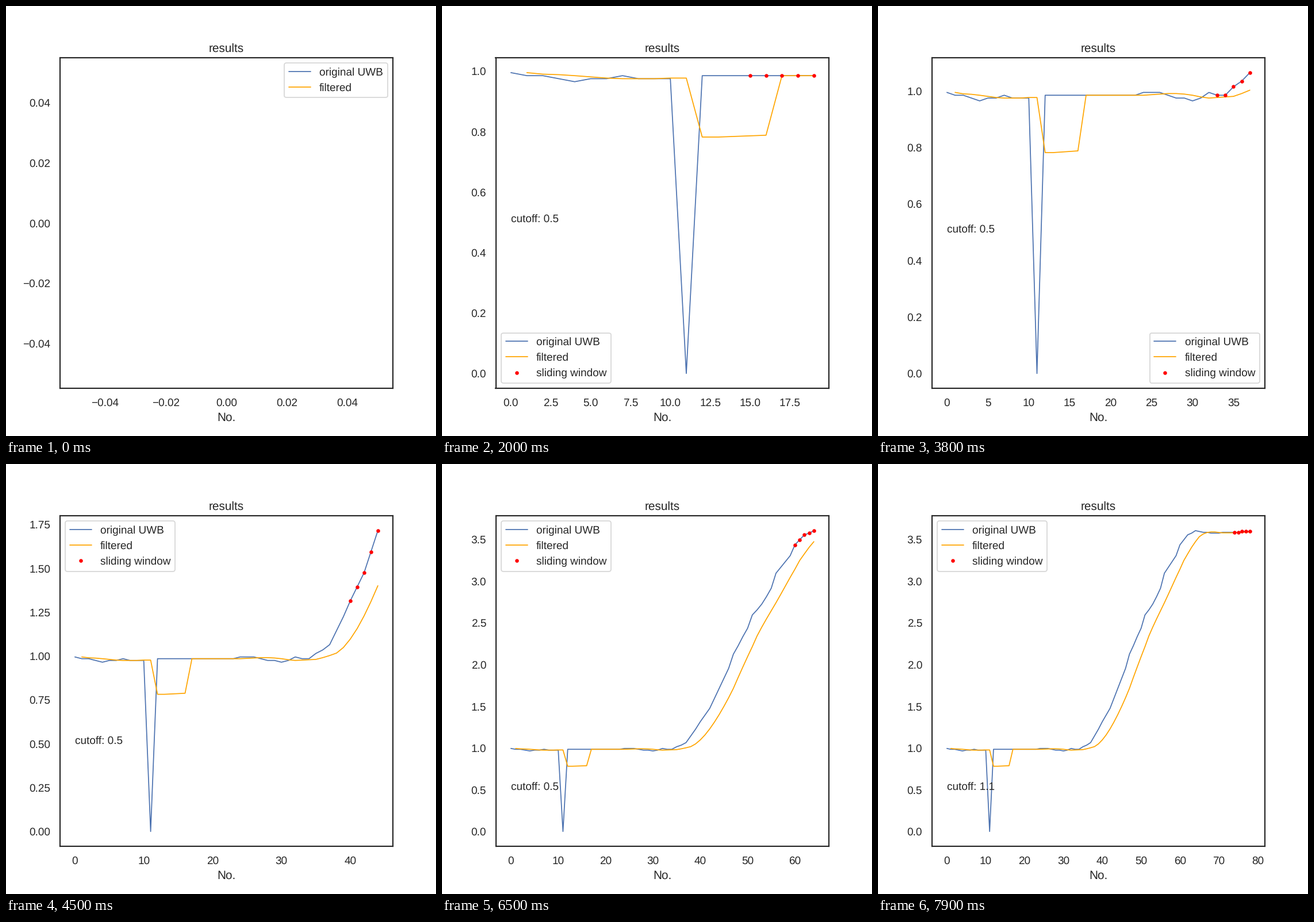
Recreate the animation shown at these times as a matplotlib script. Size 748 by 748 pixels, loop 8 s.

```python
import matplotlib.pyplot as plt
import numpy as np
from matplotlib.animation import FuncAnimation

INK = "0.15"
WINDOW = 5
FRAMES = 80
DROPOUT = 11
CUTOFF_SWITCH = 72

plt.rcParams.update({
    "font.family": "Liberation Sans",
    "font.size": 12,
    "text.hinting": "none",
    "text.color": INK,
    "axes.labelcolor": INK,
    "axes.edgecolor": INK,
    "axes.linewidth": 1.25,
    "axes.titlesize": 12,
    "axes.labelsize": 12,
    "legend.fontsize": 11,
    "lines.linewidth": 1,
    "lines.solid_capstyle": "round",
    "figure.subplot.bottom": 0.1104,
})
for axis, side in (("xtick", "bottom"), ("ytick", "left")):
    plt.rcParams.update({
        f"{axis}.{side}": False,
        f"{axis}.major.size": 6,
        f"{axis}.labelsize": 11,
        f"{axis}.color": INK,
    })

# Turning points of the measured distance: (step, millimetres)
REST = [(0, 995), (2, 985), (4, 965), (7, 985), (8, 975), (12, 985),
        (23, 985), (24, 995), (26, 995), (30, 965), (32, 995), (34, 985)]
CLIMB = [(37, 1065), (42, 1475), (46, 1955), (47, 2125), (50, 2435),
         (51, 2595), (53, 2725), (55, 2915), (56, 3095), (59, 3305),
         (60, 3435), (62, 3555), (64, 3605), (68, 3575), (78, 3595)]


def measure(steps):
    """Walk between turning points on the sensor's 10 mm grid."""
    path = np.interp(steps, *zip(*REST, *CLIMB))
    metres = (10 * np.ceil(path / 10) - 5) / 1000
    metres[DROPOUT] = 0
    return metres


steps = np.arange(FRAMES - 1)
readings = measure(steps)

# Each filtered value is the mean of the readings just before it
filtered = np.array([readings[max(0, i - WINDOW):i].mean() for i in steps[1:]])

fig, ax = plt.subplots(figsize=(6, 6), dpi=748 / 6)


def draw(n):
    ax.clear()
    ax.plot(steps[:n], readings[:n], color="#4C72B0", label="original UWB")
    ax.plot(steps[1:n], filtered[:max(n - 1, 0)], color="orange",
            label="filtered")
    if n > 0:
        recent = slice(max(0, n - WINDOW), n)
        ax.plot(steps[recent], readings[recent], "r.", markersize=5.5,
                label="sliding window")
    cutoff = 0.5 if n < CUTOFF_SWITCH else 1.1
    ax.text(0, 0.5, f"cutoff: {cutoff}", fontsize=11)
    ax.set_title("results")
    ax.set_xlabel("No.")
    ax.legend(loc="best")
    return ax.get_children()


anim = FuncAnimation(fig, draw, frames=FRAMES, init_func=lambda: draw(0),
                     interval=100, repeat=True, repeat_delay=0, blit=False)
plt.show()
```
